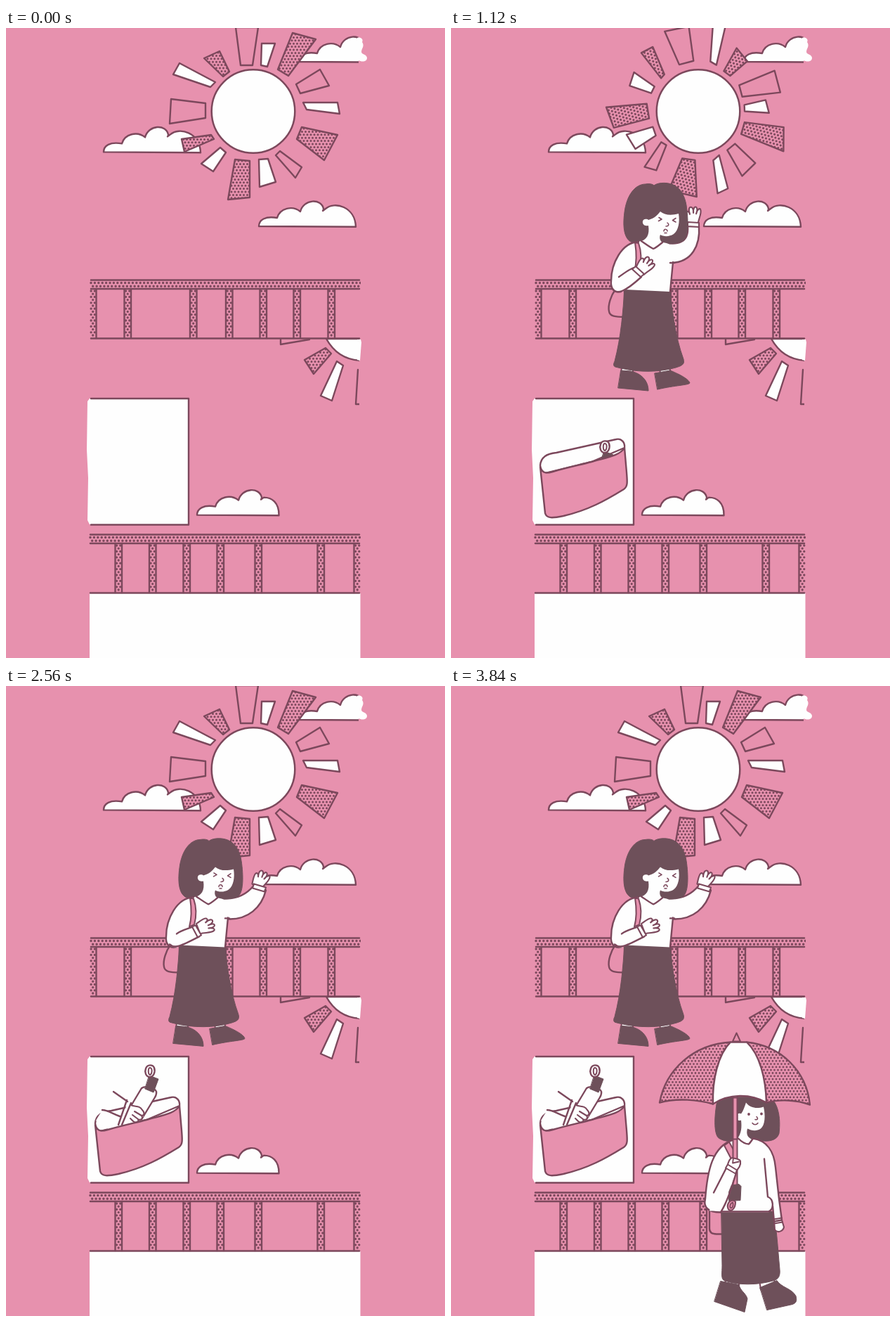
Write an HTML page with a canvas that moves like this. It is 625 px wide and 896 px high and loops after 3960 ms.

```html
<!DOCTYPE html>
<html lang="en">
<head>
<meta charset="utf-8">
<title>Parasol</title>
<style>
html, body { margin: 0; width: 100%; height: 100%; overflow: hidden; background: #e791ae; }
canvas { display: block; width: 100vw; height: 100vh; }
</style>
</head>
<body>
<canvas id="stage" width="625" height="896"></canvas>
<script>
const ctx = document.getElementById('stage').getContext('2d');
const PINK = '#e791ae', LINE = '#7c485c', DARK = '#6e505a', WHITE = '#fefefe';
const STEP = 160, LOOP = 3960;

function shape(d, fill, stroke = LINE, width = 2.4) {
  const p = new Path2D(d);
  if (fill) { ctx.fillStyle = fill; ctx.fill(p); }
  if (stroke) { ctx.strokeStyle = stroke; ctx.lineWidth = width; ctx.stroke(p); }
}
const line = (d, width) => shape(d, null, LINE, width);

function at(x, y, angle, draw) {
  ctx.save();
  ctx.translate(x, y);
  ctx.rotate(angle * Math.PI / 180);
  draw();
  ctx.restore();
}

// Staggered dots inside a path
function dots(d, x0, y0, x1, y1, dx = 5.4, dy = 4.8, r = 1.75) {
  ctx.save();
  ctx.clip(new Path2D(d));
  ctx.fillStyle = LINE;
  ctx.beginPath();
  for (let y = y0, row = 0; y <= y1; y += dy, row++) {
    for (let x = x0 + (row % 2) * dx / 2; x <= x1; x += dx) {
      ctx.moveTo(x + r, y);
      ctx.arc(x, y, r, 0, 7);
    }
  }
  ctx.fill();
  ctx.restore();
}

function dottedPoly(points) {
  const n = points.split(/[ ,]/).map(Number);
  const xs = n.filter((_, i) => i % 2 === 0), ys = n.filter((_, i) => i % 2);
  const d = 'M' + points + 'Z';
  shape(d, PINK, null);
  dots(d, Math.min(...xs), Math.min(...ys) + 2, Math.max(...xs), Math.max(...ys), 5, 4.4, 1.5);
  line(d);
}

// Sun
const RAYS = [
  ['p', '235,101 284,107 284,128 233,136'],
  ['w', '247,50 298,77 291,84 238,66'],
  ['d', '304,33 318,62 309,69 282,43'],
  ['p', '327,-1 359,-1 351,53 334,53'],
  ['w', '364,22 383,22 372,55 363,53'],
  ['d', '408,7 441,16 402,68 387,59'],
  ['p', '447,59 460,82 419,93 413,80'],
  ['w', '423,106 472,106 475,122 428,116'],
  ['d', '421,141 472,152 453,188 414,158'],
  ['p', '390,175 421,198 412,213 384,181'],
  ['w', '360,187 373,186 384,219 361,226'],
  ['d', '326,187 347,189 347,241 316,244'],
  ['w', '305,170 313,177 295,204 278,193'],
  ['d', '250,158 292,152 296,158 254,176']
];

function ray(kind, points) {
  if (kind === 'd') dottedPoly(points);
  else shape('M' + points + 'Z', kind === 'w' ? WHITE : PINK);
}

function sun(k) {
  const [angle, dx, dy] = k % 2 === 0 ? [0, 0, 0] : k < 6 ? [-57.9, -7.5, 3] : [75.2, 0, -2.7];
  at(352 + dx, 118 + dy, angle, () => {
    ctx.translate(-352, -118);
    RAYS.forEach(r => ray(...r));
  });
  ctx.beginPath();
  ctx.arc(352, 118.5, 59.3, 0, 7);
  ctx.fillStyle = WHITE;
  ctx.fill();
  ctx.lineWidth = 2.5;
  ctx.strokeStyle = LINE;
  ctx.stroke();
}

function lowerSun() {
  ctx.save();
  ctx.beginPath();
  ctx.rect(385, 442, 118, 120);
  ctx.clip();
  line('M391,443V450L432,443');
  ray('d', '455,455 463,463 438,492 425,472');
  ray('w', '471,474 480,480 464,530 448,523');
  line('M501,486L498,535H506');
  shape('M456,442C467,462 485,473 508,473V442Z', WHITE);
  ctx.restore();
  shape('M500,443H505L506,447L504,473L500,472Z', WHITE, null);
}

// Scenery
function cloud(x, y, last = 'C108,-36 137,-28 138,0.8') {
  at(x, y, 0, () => shape(
    'M0,0C0,-9 9,-15 26,-12C30,-26 48,-30 59,-21C64,-39 89,-40 92,-25C92,-23 91,-22 91,-22L95,-25' + last + 'Z', WHITE));
}

function clouds() {
  cloud(139, 176.4);
  cloud(360, 282);
  cloud(272, 692.6, 'C106,-25 117,-18 116.5,0.6');
  ctx.save();
  ctx.beginPath();
  ctx.rect(400, 0, 102, 60);
  ctx.clip();
  cloud(417, 48);
  ctx.restore();
  shape('M500,14C506,12 509,17 507,20C511,26 506,29 506,34C506,38 514,37 514,43C513,49 506,48 501,46Z', WHITE, null);
}

function railing(x0, x1, y, posts, open) {
  const bar = `M${x0 - 2},${y}H${x1 + 2}V${y + 12.5}H${x0 - 2}Z`;
  dots(bar, x0, y + 4, x1 + 2, y + 11);
  posts.forEach(x => {
    const d = `M${x},${y + 12.5}h9.5v70h-9.5Z`;
    shape(d, PINK, null);
    dots(d, x + 2.1, y + 15.5, x + 9, y + 82, 5.2, 4.2, 1.65);
    if (x !== open || open > 400) line(`M${x},${y + 12.5}v70`);
    if (x !== open || open < 400) line(`M${x + 9.5},${y + 12.5}v70`);
  });
  line(`M${x0},${y}H${x1}M${x0},${y + 12.5}H${x1}M${x0},${y + 83}H${x1}`, 2.6);
}

// Inset with the pouch
function panel() {
  shape('M119,527H260V706H119L116,700L117,640L115,600L116,531Z', WHITE, null);
  line('M121,527H260V706.5H121');
}

function foldedParasol() {
  shape('M193,572C198,568 208,571 213,575C215,577 214,582 212,585L186,628L160,627Z', WHITE);
  shape('M204,554L217,559L210,578L198,573Z', DARK, DARK, 1);
  shape('M205,556C199,556 197,549 199,544C201,538 209,538 211,543C213,549 210,556 205,556Z', WHITE);
  line('M205,553C202,552 202,543 205,543C209,543 208,552 205,553', 2);
  shape('M153,577L173,591L163,612L137,603L128,618L160,640L184,625Z', WHITE, null);
  shape('M173,592L166,612L160,640L180,635L192,618C197,613 197,607 193,603C188,597 182,599 176,595Z', WHITE, null);
  line('M153,577L173,591M137,603C145,603 151,608 162,612M172,589L160,624M178,593L165,624');
  line('M178,596C184,599 190,596 194,603C198,607 197,611 193,611L183,605M193,611C196,616 191,618 188,616L180,610M188,616C190,621 184,622 181,619L177,615', 2.1);
}

function pouch(k) {
  if (k < 7) return;
  const rise = k < 11 ? (k - 7) / 4 : Math.min(1, (k - 11) / 3);
  const dx = k < 11 ? 14 - rise : 13 * (1 - rise);
  const dy = k < 11 ? 48 - 33 * rise : 15 * (1 - rise);
  shape('M127,622C128,609 138,605 150,604L235,585C243,583 248,590 247,597L200,617L135,633C130,632 127,627 127,622Z', WHITE);
  at(dx, dy, 0, foldedParasol);
  shape('M127,624C130,635 138,633 145,631C165,625 185,621 200,617C220,611 240,609 247,597L250,632C251,645 252,652 246,656C220,672 195,686 160,694C145,697 136,698 134,690Z', PINK);
}

function hand() {
  shape('M-8,12C-10,4 -12,-1 -10,-4C-8,-6 -6,-4 -5,-1C-8,-8 -6,-12 -3,-11C-1,-10 0,-6 0,-3C-1,-10 2,-13 4,-11C6,-9 5,-4 4,-2C5,-8 9,-11 10,-8C12,-3 8,4 7,12Z', WHITE, LINE, 2.1);
}

// Walker shielding her eyes; on even steps she rises and reaches out
function walker(k) {
  if (k < 1) return;
  const up = k % 2 === 0;
  const x = -9.25 * Math.max(0, 7 - k);
  at(x, up ? -3.6 : 0, 0, () => {
    shape('M234,372C228,380 223,394 225,403C226,410 234,411 247,411V372Z', PINK);
    shape('M243,482L242,492H259V482ZM297,482L298,492H313L311,482Z', WHITE, LINE, 2);
    shape('M242,487L256,488C270,491 281,501 281,516L238,512Z', DARK, DARK, 1);
    shape('M290,491L312,487C322,491 339,499 340,505C338,508 320,508 294,514Z', DARK, DARK, 1);
    shape('M247,371L312,375C315,402 319,438 331,471C333,479 329,481 312,485C285,491 255,488 234,482C231,481 231,478 233,474C242,440 245,402 247,371Z', DARK, DARK, 1);
    if (up) {
      shape('M303,305C322,308 340,303 353,287L370,294C364,318 345,337 314,335Z', WHITE);
      at(363, 278, 27, hand);
      shape('M353,285L370,290L368,296L351,291Z', WHITE, LINE, 2.1);
    } else {
      shape('M303,305C322,309 339,306 337,282H353C355,309 343,333 314,334Z', WHITE);
      at(345, 266, 2, hand);
      shape('M337,276L353,277L353,283L337,282Z', WHITE, LINE, 2.1);
    }
    shape('M258,305C247,301 244,285 247,262C250,238 262,222 277,222C283,221 287,222 289,224C295,219 312,219 320,225C328,230 333,240 335,252C338,272 339,301 328,304C316,308 300,307 295,305Z', DARK, DARK, 1);
    shape('M281,273C289,271 294,266 298,261C304,266 313,267 324,264C326,275 324,288 317,293C311,297 303,297 298,294C296,299 298,304 303,306L288,316L267,304C279,302 283,294 281,281C274,283 271,276 274,273C277,271 280,272 281,273Z', WHITE, null);
    shape('M265,304C243,305 228,335 228,360C227,370 232,377 242,376L248,372L312,375L316,334C322,315 316,307 302,305L288,314L273,303Z', WHITE, null);
    line('M316,333L312,375M312,334H318');
    line('M271,303C277,307 282,311 288,314C293,312 297,308 301,305');
    line('M267,304C243,305 228,335 228,360C227,370 232,377 242,375');
    shape('M262,305L267,306C272,320 271,332 268,343L261,346C265,332 264,318 262,305Z', PINK, LINE, 2);
    line('M296,269.5L300,272L295.5,274.5M320,270.5L315.5,273.5L320,276', 1.6);
    line('M308,277C311,279 310,282 306,282M303,289C303,285 308,286 308,289M304,291.5H307', 1.5);
    if (up) {
      shape('M240,356L266,345L275,357L246,374C235,378 229,369 231,359Z', WHITE, null);
      line('M243,356C249,351 258,349 266,346M233,371C240,378 250,373 275,360');
      at(285, 345, 69, hand);
      shape('M265,346L270,344L278,358L273,361Z', WHITE, LINE, 2.1);
    } else {
      shape('M238,354L260,340L271,353L246,373C235,379 228,370 230,359Z', WHITE, null);
      line('M239,354C245,350 252,344 260,341M230,371C236,380 248,375 271,354');
      at(277, 337, 40, hand);
      shape('M258,343L263,339L275,350L270,354Z', WHITE, LINE, 2.1);
    }
  });
}

function openParasol() {
  const left = 'M275,598C284,550 324,515 376,512C358,530 350,566 351,600C330,594 300,591 275,598Z';
  const right = 'M399,512C447,517 484,552 489,601C470,594 446,593 427,598C426,564 417,530 399,512Z';
  [left, right].forEach(d => {
    shape(d, PINK, null);
    dots(d, 276, 513, 490, 602, 5, 4.3, 1.4);
    line(d);
  });
  shape('M376,512H399C418,530 426,564 427,598C405,585 373,585 351,600C350,566 358,530 376,512Z', WHITE);
  shape('M379,511L384.5,499L390,511Z', PINK, LINE, 2);
}

function shadedWalker(k) {
  if (k < 19) return;
  at((k - 21) * 7.33, k % 2 ? 0 : -5.5, 0, () => {
    shape('M346,750V777C346,783 350,785 356,785H366V750Z', PINK);
    shape('M369,850L367,862H388V850ZM417,850L419,864L440,858L438,850Z', WHITE, LINE, 2);
    shape('M362,852L388,857C390,866 398,869 400,877L396,896L353,881Z', DARK, DARK, 1);
    shape('M418,861L442,851C448,861 463,862 469,873C471,881 469,883 464,885L428,893Z', DARK, DARK, 1);
    shape('M363,753L437,753C442,780 443,802 446,835C447,845 444,849 438,851C415,858 385,858 367,851C362,849 364,840 364,830Z', DARK, DARK, 1);
    shape('M438,765L439,779C443,784 451,781 452,775L449,765Z', WHITE, LINE, 2.1);
    shape('M358,590C353,612 351,644 360,649C370,655 380,653 390,651H413C430,655 442,652 445,642C448,618 443,598 432,590Z', DARK, DARK, 1);
    shape('M391,614C394,610 396,604 398,598C404,606 414,607 423,604C426,617 425,630 419,635C413,639 406,638 400,635C398,643 400,648 408,651L402,658L385,650C392,642 392,632 391,623C384,626 382,617 386,614C388,613 390,613 391,614Z', WHITE, null);
    shape('M380,651C350,660 343,695 340,735C337,747 343,754 360,754L363,754L430,754L437,745L438,766L449,765L445,735L440,690C438,668 428,652 409,649L402,657L387,649Z', WHITE, null);
    line('M387,649C391,653 397,657 402,657C404,655 406,652 408,649C428,652 438,668 440,690L445,735L449,765L438,767L436,745');
    line('M424,678L429,732C437,735 439,749 430,753H363');
    line('M380,651C350,660 343,695 340,735C337,747 344,754 362,754');
    line('M437,764L449,762M438,770L450,768', 2);
    shape('M367,659L374,654L385,674L380,684Z', PINK, LINE, 2);
    shape('M379.5,588H385.5V717H379.5Z', PINK, LINE, 2);
    shape('M374,716L388,714L391,717L390,737L374,738Z', DARK, DARK, 1);
    shape('M380,737C373,737 370,744 373,750C378,754 383,748 383,739Z', PINK, LINE, 2.1);
    line('M379,740C375,741 374,748 377,748C380,747 380,742 379,740', 1.8);
    shape('M371,690C373,681 376,675 380,677C384,678 388,678 390,681C391,686 388,693 382,696Z', WHITE, LINE, 2.1);
    line('M380,677L379,684L388,682', 1.8);
    shape('M352,726L370,690L384,698L362,752L346,752Z', WHITE, null);
    line('M352,726L371,689M384,698C378,717 372,738 362,754');
    shape('M372,686L385,694L383,699L369,691Z', WHITE, LINE, 2);
    ctx.fillStyle = LINE;
    ctx.beginPath();
    ctx.arc(402, 614.5, 1.9, 0, 7);
    ctx.arc(420, 614, 1.9, 0, 7);
    ctx.fill();
    line('M413,618C416,621 414,623 411,622M407,627C409,630 413,630 415,627', 1.5);
    openParasol();
    shape('M379.5,591H385.5V650H379.5Z', PINK, LINE, 2);
  });
}

function draw(now) {
  const k = Math.min(24, Math.floor((now % LOOP) / STEP));
  ctx.lineJoin = ctx.lineCap = 'round';
  ctx.fillStyle = PINK;
  ctx.fillRect(0, 0, 625, 896);
  clouds();
  sun(k);
  lowerSun();
  railing(121, 503, 358.5, [119, 168.5, 262, 313, 361.5, 409.5, 458.5], 119);
  ctx.fillStyle = WHITE;
  ctx.fillRect(119, 804, 385.5, 92);
  railing(120, 503, 720.5, [155.5, 204, 252.5, 300.5, 354.5, 443.5, 495.5], 495.5);
  panel();
  pouch(k);
  walker(k);
  shadedWalker(k);
}

const start = performance.now();
function tick() {
  draw(performance.now() - start);
  requestAnimationFrame(tick);
}
tick();
</script>
</body>
</html>
```
